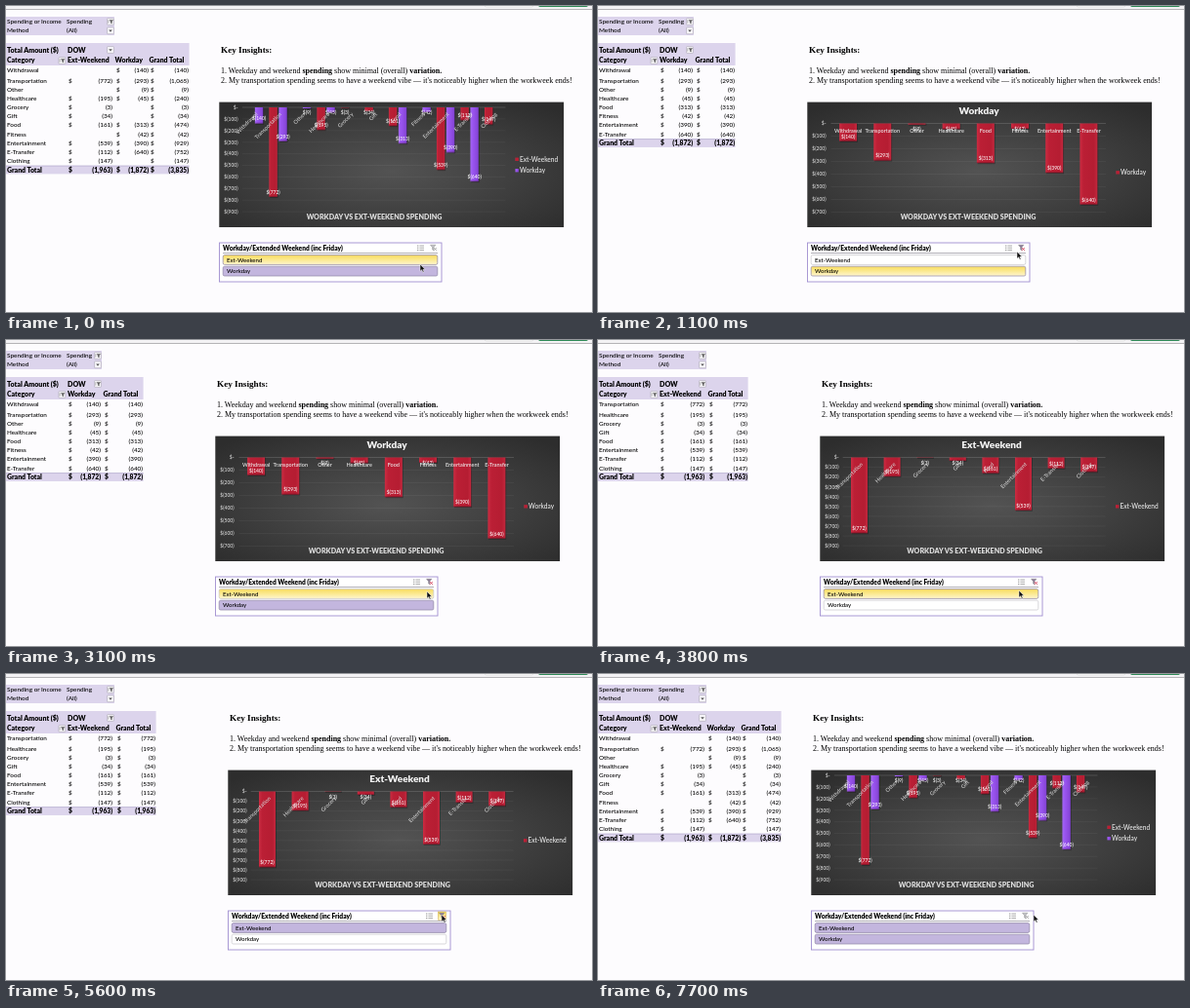
These frames come from a looping animation (600x314 px, 7800 ms). An HTML page:

```html
<!DOCTYPE html>
<html lang="en">
<head>
<meta charset="utf-8">
<title>Spending dashboard</title>
<style>
  html, body { margin: 0; width: 100%; height: 100%; overflow: hidden; background: #fdfcfe; }
  svg { display: block; width: 100%; height: 100%; font-family: Lato, "Open Sans", sans-serif; }
  text { white-space: pre; }
</style>
</head>
<body>
<svg viewBox="0 0 600 314" xmlns="http://www.w3.org/2000/svg">
  <defs>
    <radialGradient id="panel" cx=".5" cy=".55" r=".68">
      <stop offset="0" stop-color="#535353"/><stop offset="1" stop-color="#2d2d2d"/>
    </radialGradient>
    <linearGradient id="red">
      <stop offset="0" stop-color="#cc2c42"/><stop offset=".2" stop-color="#bb1f35"/>
      <stop offset=".8" stop-color="#b51d32"/><stop offset="1" stop-color="#c4283e"/>
    </linearGradient>
    <linearGradient id="violet">
      <stop offset="0" stop-color="#a468f4"/><stop offset=".3" stop-color="#9a55f0"/>
      <stop offset=".8" stop-color="#8a48dc"/><stop offset="1" stop-color="#7c3fcb"/>
    </linearGradient>
    <linearGradient id="gold" x2="0" y2="1">
      <stop offset="0" stop-color="#f8dc60"/><stop offset=".45" stop-color="#fbe88c"/>
      <stop offset="1" stop-color="#fff6cf"/>
    </linearGradient>
  </defs>
  <g id="scene"></g>
  <g id="cursor">
    <path id="arrow" d="M0 0V7.2L1.7 5.7L2.9 8.3L4 7.8L2.9 5.3H5.1Z" fill="#111" stroke="#fff" stroke-width=".5"/>
    <path id="cross" d="M-.8-3h1.6v2.2H3v1.6H.8V3H-.8V.8H-3V-.8H-.8Z" fill="#fff" stroke="#444" stroke-width=".8"/>
  </g>
</svg>
<script>
const LOOP = 7800, LAVENDER = '#dcd4ec';
const $ = id => document.getElementById(id);

// category, extended weekend, workday
const DATA = [
  ['Withdrawal', 0, 140], ['Transportation', 772, 293], ['Other', 0, 9],
  ['Healthcare', 195, 45], ['Grocery', 3, 0], ['Gift', 34, 0], ['Food', 161, 313],
  ['Fitness', 0, 42], ['Entertainment', 539, 390], ['E-Transfer', 112, 640], ['Clothing', 147, 0]
];
const NAMES = ['', 'Ext-Weekend', 'Workday'];

// Layout per filter: sheet offset, column starts and right edges
const VIEWS = {
  both: { ox: 218, cols: [1, 2], left: [64, 113, 148], right: [109, 146, 187], btn: 107 },
  work: { ox: 214, cols: [2], left: [64, 101], right: [97, 140], btn: 94 },
  ext:  { ox: 227, cols: [1], left: [64, 114], right: [109, 153], btn: 107 }
};
const PLOTS = {
  both: { zero: 104, step: 11.9, max: 9, x0: 23.8, x1: 293.4, bar: 8.4, title: 159, legend: 304 },
  work: { zero: 120.5, step: 13, max: 7, x0: 24.5, x1: 306, bar: 18, title: 165, legend: 317 },
  ext:  { zero: 120.5, step: 10.07, max: 9, x0: 23.7, x1: 292.5, bar: 17, title: 158.5, legend: 303.5 }
};

const rect = (x, y, w, h, fill, more = '') =>
  `<rect x="${x}" y="${y}" width="${w}" height="${h}" fill="${fill}" ${more}/>`;
const line = (x1, y1, x2, y2, color, w = .6) =>
  `<path d="M${x1} ${y1}L${x2} ${y2}" stroke="${color}" stroke-width="${w}"/>`;
const text = (x, y, s, size, o = {}) =>
  `<text x="${x}" y="${y}" font-size="${size}" fill="${o.fill || '#000'}" text-anchor="${o.at || 'start'}"` +
  ` font-weight="${o.bold ? 900 : 500}" ${o.more || ''}>${s}</text>`;
const money = n => `(${n.toLocaleString('en-US')})`;
const rowsOf = view => DATA.filter(d => VIEWS[view].cols.some(c => d[c]));

function button(x, y, filtered) {
  const mark = filtered
    ? `<path d="M${x - 1} ${y - 1.6}h3.6l-1.3 1.6v2l-1-.6v-1.4zM${x - 2.2} ${y - 1.8}v3.4" fill="#555" stroke="#555" stroke-width=".4"/>`
    : `<path d="M${x - 1.8} ${y - .8}h3.6l-1.8 2.2z" fill="#555"/>`;
  return rect(x - 3.4, y - 3.4, 6.8, 6.8, '#f8f7fa', 'stroke="#a9a4b4" stroke-width=".6" rx=".6"') + mark;
}

function sheetTop() {
  return rect(0, 0, 600, 3, '#f4f3f5') + line(0, 3.5, 600, 3.5, '#b4b3b6', 1) +
    rect(490, -6, 50, 7, '#fff', 'rx="2" stroke="#d4d4d4" stroke-width=".6"') +
    rect(545, -6, 51, 7, '#2f8a57', 'rx="2"');
}

function table(view) {
  const v = VIEWS[view], rows = rowsOf(view), edge = v.right[v.right.length - 1];
  const b = { bold: true };
  let s = rect(0, 11, v.btn + 4, 19, LAVENDER) + rect(0, 38, edge + .6, 23, LAVENDER);
  s += text(1, 18.2, 'Spending or Income', 6.4) + text(62, 18.2, 'Spending', 6.4);
  s += text(1, 27.4, 'Method', 6.4) + text(62, 27.4, '(All)', 6.4);
  s += button(v.btn, 16, true) + button(v.btn, 25.3, false);
  s += text(1, 47.8, 'Total Amount ($)', 7.1, b) + text(63, 47.8, 'DOW', 7.1, b);
  s += button(v.btn, 45, view !== 'both') + button(57.4, 56, true);
  s += text(1, 58.4, 'Category', 6.95, b);
  [...v.cols.map(c => NAMES[c]), 'Grand Total'].forEach((name, i) =>
    s += text(v.left[i] - (i ? 1.5 : 1), 58.4, name, 6.95, b));

  const put = (values, y, bold) => values.forEach((n, i) => {
    if (!n) return;
    const size = bold ? 6.65 : 6.35;
    s += text(v.left[i], y, '$', size, { bold });
    s += text(v.right[i], y, money(n), size, { bold, at: 'end' });
  });
  const withSum = list => [...list, list.reduce((a, n) => a + n, 0)];
  const rowY = i => i ? 76.5 + 9.15 * (i - 1) : 66.2;

  rows.forEach((r, i) => {
    s += text(1, rowY(i) + 2.2, r[0], 6.35);
    put(withSum(v.cols.map(c => r[c])), rowY(i) + 2.2, false);
  });
  const y = rowY(rows.length);
  s += rect(0, y - 4, edge + .6, 8.4, LAVENDER) + line(0, y - 4, edge + .6, y - 4, '#a79cc4', .6);
  s += text(1, y + 2.7, 'Grand Total', 6.95, b);
  put(withSum(v.cols.map(c => rows.reduce((a, r) => a + r[c], 0))), y + 2.7, true);
  return s;
}

function insights(ox) {
  const serif = { more: 'font-family="Liberation Serif, Times, serif"' };
  const strong = w => `<tspan font-weight="700">${w}</tspan>`;
  return text(ox + 2, 47.6, 'Key Insights:', 9.2, { bold: true, ...serif }) +
    text(ox + 2, 68.6, `1. Weekday and weekend ${strong('spending')} show minimal (overall) ${strong('variation.')}`, 8, serif) +
    text(ox + 2, 78.8, "2. My transportation spending seems to have a weekend vibe — it's noticeably higher when the workweek ends!", 8, serif);
}

function chart(view, ox) {
  const p = PLOTS[view], cols = VIEWS[view].cols, rows = rowsOf(view), both = view === 'both';
  const paint = c => both && c === 2 ? 'url(#violet)' : 'url(#red)';
  const gap = (p.x1 - p.x0) / rows.length;
  let s = rect(ox + .3, 98.6, 352.8, 128.4, 'url(#panel)'), bars = '', names = '', values = '';

  for (let i = 0; i <= p.max; i++) {
    const y = p.zero + i * p.step;
    s += line(ox + p.x0, y, ox + p.x1, y, i ? 'rgba(255,255,255,.08)' : 'rgba(255,255,255,.24)');
    s += text(ox + 19.6, y + 1.8, i ? `$(${i * 100})` : '$-', 5, { at: 'end', fill: '#dedede' });
  }
  rows.forEach((r, i) => {
    const cx = ox + p.x0 + gap * (i + .5);
    cols.forEach((c, k) => {
      if (!r[c]) return;
      const mid = cx + (both ? (k ? 5 : -5) : 0), h = r[c] / 100 * p.step, x = mid - p.bar / 2;
      bars += rect(x + .8, p.zero, p.bar, h + 1, 'rgba(0,0,0,.3)') + rect(x, p.zero, p.bar, h, paint(c));
      if (h > 3) bars += rect(x, p.zero + h - 1, p.bar, 1, 'rgba(50,0,20,.3)');
      values += text(mid, Math.max(p.zero + h - 5, p.zero + 5.5) + 1.8, `$(${r[c]})`, 5, { at: 'middle', fill: '#fff' });
    });
    names += view === 'work'
      ? text(cx, 129.5, r[0], 5.5, { at: 'middle', fill: '#f0f0f0' })
      : text(0, 2, r[0], 5.6, { at: 'end', fill: '#d6d6d6', more: `transform="translate(${cx + 2.5} ${p.zero + 6}) rotate(-45)"` });
  });
  s += bars + names + values;

  if (!both) s += text(ox + 176, 111.2, NAMES[cols[0]], 10, { bold: true, at: 'middle', fill: '#f4f4f4' });
  s += text(ox + p.title, 218.6, 'WORKDAY VS EXT-WEEKEND SPENDING', 7.15, { bold: true, at: 'middle', fill: '#dcdcdc' });
  cols.forEach((c, k) => {
    const y = both ? 157.3 + 11.4 * k : 170.8;
    s += rect(ox + p.legend - .5, y - 1.7, 3.4, 3.4, paint(c));
    s += text(ox + p.legend + 4, y + 2.3, NAMES[c], 6.55, { fill: '#ececec' });
  });
  return s;
}

function slicer(view, ox, hover) {
  const active = view !== 'both';
  let s = rect(ox + .5, 243, 227.5, 40, '#fff', 'stroke="#a08fd0" stroke-width=".9"');
  s += text(ox + 4, 250.6, 'Workday/Extended Weekend (inc Friday)', 6.65, { bold: true });
  s += line(ox + 4, 253.6, ox + 224, 253.6, '#8b8794', .7);
  for (let i = 0; i < 3; i++) {
    const y = 246 + i * 2.2;
    s += line(ox + 203, y, ox + 204.4, y, '#888', .9) + line(ox + 205.4, y, ox + 210, y, '#888', .7);
  }
  const fx = ox + 219.5;
  if (hover === 'clear') s += rect(fx - 4, 244, 8, 8.2, 'url(#gold)', 'stroke="#c9a63a" stroke-width=".5"');
  s += `<path d="M${fx - 3} 245.2h5.4l-2.1 2.5v3l-1.2-.8v-2.2z" fill="${active ? '#8a7a96' : '#c4c4c8'}" stroke="#777" stroke-width=".4"/>`;
  s += `<path d="M${fx + .5} 248l2.8 2.9m0-2.9l-2.8 2.9" stroke="${active ? '#d02c4a' : '#999'}" stroke-width=".8"/>`;

  [1, 2].forEach(c => {
    const y = c === 1 ? 255.6 : 267.2;
    const on = VIEWS[view].cols.includes(c);
    const fill = hover === c ? 'url(#gold)' : on ? '#c3b6de' : '#fff';
    s += rect(ox + 4.2, y, 219.6, 9.8, fill, `rx="1.6" stroke="${on ? '#8f85a5' : '#c8c6cc'}" stroke-width=".7"`);
    s += text(ox + 8, y + 7.2, NAMES[c], 6.1);
  });
  return s;
}

function tooltip() {
  return rect(445.6, 253.6, 46.4, 9.4, 'rgba(0,0,0,.14)', 'rx="1.4"') +
    rect(445, 252.6, 46.4, 9.2, '#ececec', 'rx=".8" stroke="#c4c4c4" stroke-width=".5"') +
    text(447, 259.1, 'Clear Filter (Alt+C)', 4.65, { more: 'font-family="Inter, sans-serif"' });
}

// Value of the last step reached: [time, value] pairs
const at = (steps, t) => steps.reduce((v, s) => t >= s[0] ? s[1] : v, null);
const SHEET = [[0, 'both'], [1000, 'work'], [3500, 'ext'], [6000, 'both']];
const CHART = [[0, 'both'], [1000, 'work'], [3500, 'ext'], [6600, 'both']];
const HOVER = [[0, 1], [500, 2], [1400, 0], [2900, 1], [5100, 0], [5250, 'clear'], [6000, 0]];
const TIP = [[0, false], [6100, true], [6900, false]];
const PATH = [
  [0, 424, 265], [300, 424, 265], [600, 426, 270], [900, 426, 270], [1100, 429, 252], [1500, 444, 241],
  [2100, 445, 241], [2500, 445, 241], [3000, 431, 258], [3800, 431, 257], [4900, 431, 257],
  [5300, 446, 247], [LOOP, 446, 247]
];

function pointer(t) {
  const i = Math.max(1, PATH.findIndex(p => p[0] > t)), a = PATH[i - 1], b = PATH[i];
  const u = (t - a[0]) / (b[0] - a[0]), e = u * u * (3 - 2 * u);
  return [a[1] + (b[1] - a[1]) * e, a[2] + (b[2] - a[2]) * e];
}

let shown = '';
function draw(t) {
  const state = [SHEET, CHART, HOVER, TIP].map(s => at(s, t)), key = state.join();
  if (key !== shown) {
    const [view, plot, hover, tip] = state, ox = VIEWS[view].ox;
    $('scene').innerHTML = sheetTop() + table(view) + insights(ox) + chart(plot, ox) +
      slicer(view, ox, hover) + (tip ? tooltip() : '');
    shown = key;
  }
  const [x, y] = pointer(t), cross = t >= 1400 && t < 2700;
  $('cursor').setAttribute('transform', `translate(${x} ${y})`);
  $('arrow').style.display = cross ? 'none' : '';
  $('cross').style.display = cross ? '' : 'none';
}

const start = performance.now();
function tick() {
  draw((performance.now() - start) % LOOP);
  requestAnimationFrame(tick);
}
tick();
</script>
</body>
</html>
```
